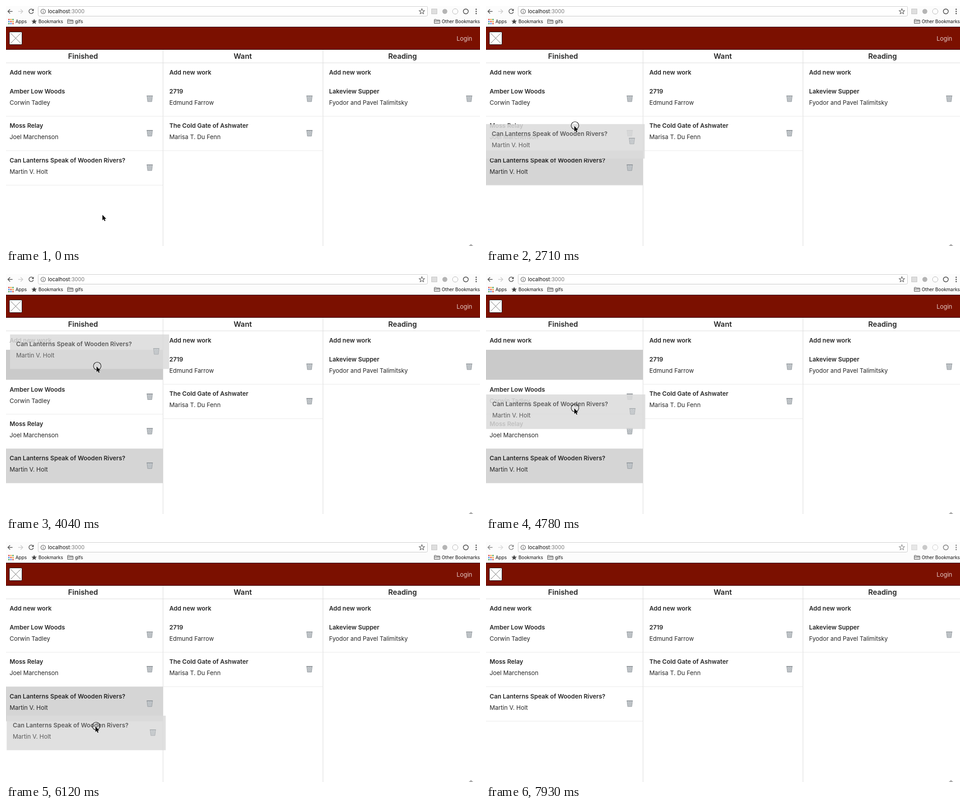
These frames come from a looping animation (1052 px wide and 532 px high, 8.03 s). An HTML page:

```html
<!DOCTYPE html>
<html lang="en">
<head>
<meta charset="utf-8">
<title>Reading list</title>
<style>
  html, body { margin: 0; width: 100%; height: 100%; overflow: hidden; background: #fff; }
  svg { display: block; width: 1052px; height: 532px; }
  text { font: 13.3px Inter, "Open Sans", sans-serif; fill: #262626; }
  .title { font-size: 13.5px; font-weight: 600; }
  .head { font-size: 16.2px; font-weight: 600; text-anchor: middle; }
  .bar { font-size: 10.3px; fill: #111; }
  .url { font-size: 11.5px; fill: #111; }
  .line { fill: none; stroke: #555; stroke-width: 1.5; }
  #ghost text { fill: #5c5c5c; }
  #ghost .bin { opacity: .7; }
</style>
</head>
<body>
<svg viewBox="0 0 1052 532">
  <defs>
    <g id="bin">
      <path d="M-6-6H6L4.6 6.5H-4.6Z" fill="#c6cbcf" stroke="#92989d"/>
      <path d="M-4.5-4 4 5.5M-1-4.5 4.5 1.5M-4.5 0 0 6M4.5-4-4 5.5M1-4.5-4.5 1.5M4.5 0 0 6" stroke="#a4a9ae" stroke-width=".6"/>
      <path d="M-6.8-6.2H6.8" stroke="#7f858a" stroke-width="1.3"/>
    </g>
    <path id="folder" d="M.5 9.5V1.5Q.5.5 1.5.5H4.5L6 2H12Q13 2 13 3V9.5ZM.5 4H13" fill="#ddd" stroke="#555"/>
    <path id="star" d="M0-6 1.7-2 6-1.8 2.7 1 3.8 5.3 0 2.9-3.8 5.3-2.7 1-6-1.8-1.7-2Z"/>
  </defs>

  <rect width="1052" height="46" fill="#fcfcfc"/>
  <rect x="71.5" y=".5" width="864" height="22" rx="3" fill="#fff" stroke="#c8c8c8"/>
  <g id="tools">
    <path class="line" d="M14.5 12H4.5M9 7.2 4.2 12 9 16.8"/>
    <path class="line" d="M27 12H37M32.5 7.2 37.3 12 32.5 16.8" style="stroke:#ccc"/>
    <path class="line" d="M60.2 9A5 5 0 1 0 60.8 13"/>
    <path d="M61.6 6V11H56.6Z" fill="#555"/>
    <use href="#star" x="923" y="12" fill="none" stroke="#555" stroke-width="1.1"/>
    <rect x="944.5" y="6.5" width="12" height="11" fill="#dedede" stroke="#c4c4c4"/>
    <circle cx="974" cy="12" r="5.5" fill="#b4b4b4"/>
    <circle cx="997" cy="12" r="6" fill="#fff" stroke="#b4b4b4"/>
    <circle cx="1020.5" cy="12" r="5.4" fill="#fff" stroke="#505050" stroke-width="1.6"/>
    <path d="M1043.5 7.3v.01m0 4.7v.01m0 4.7v.01" stroke="#555" stroke-width="3" stroke-linecap="round"/>
  </g>
  <circle cx="82.5" cy="12" r="5" fill="none" stroke="#555" stroke-width="1.1"/>
  <path d="M82.5 8.8V10M82.5 11.2V15" stroke="#555" stroke-width="1.2"/>
  <text class="url" x="93" y="16">localhost<tspan fill="#777">:3000</tspan></text>
  <g id="apps"></g>
  <use href="#star" x="62.5" y="34.5" fill="#444"/>
  <use href="#folder" x="136" y="29"/>
  <use href="#folder" x="950" y="29"/>
  <text class="bar" x="21" y="38">Apps</text>
  <text class="bar" x="72" y="38">Bookmarks</text>
  <text class="bar" x="153" y="38">gifs</text>
  <text class="bar" x="967" y="38">Other Bookmarks</text>

  <rect y="46" width="1052" height="51" fill="#7b1000"/>
  <path d="M0 46.5H1052M0 96.5H1052" stroke="#2a0500"/>
  <rect x="7.5" y="57.5" width="28" height="28" rx="2" fill="#fff" stroke="#111"/>
  <path d="M10 60 33 83M33 60 10 83" stroke="#444" stroke-width=".8"/>
  <text x="1000" y="76.5" style="fill:#e4cac6">Login</text>

  <path d="M0 126H1052M348.5 97V532M703.5 97V532" stroke="#dadada"/>
  <path d="M1027 532 1032 527.5 1037 532Z" fill="#aaa"/>
  <g id="board"></g>
  <rect id="gap" width="348" height="66.5" fill="#cacaca"/>
  <g id="ghost"></g>
  <g id="cursor">
    <circle id="ring" cx="1.5" cy="-1" r="8.5" fill="none" stroke="#111" stroke-width="1.1"/>
    <path d="M0 0V12L2.8 9.5 4.7 13.8 6.7 12.9 4.8 8.7H8.5Z" stroke="#fff" stroke-width=".9" paint-order="stroke"/>
  </g>
</svg>
<script>
const $ = id => document.getElementById(id);
const LOOP = 8030, START = 1364, TICK = 148, BLUR = 7930;
const TOP = 168, ROW = 76.4, GAP = 66.5, COLUMN = 354.5;

const columns = [
  ['Finished', [
    ['Amber Low Woods', 'Corwin Tadley'],
    ['Moss Relay', 'Joel Marchenson'],
    ['Can Lanterns Speak of Wooden Rivers?', 'Martin V. Holt']]],
  ['Want', [
    ['2719', 'Edmund Farrow'],
    ['The Cold Gate of Ashwater', 'Marisa T. Du Fenn']]],
  ['Reading', [
    ['Lakeview Supper', 'Fyodor and Pavel Talimitsky']]]
];
const books = columns[0][1];

const label = (x, y, s, cls = '') => `<text class="${cls}" x="${x}" y="${y}">${s}</text>`;
const content = ([title, author], x) =>
  label(x, 26, title, 'title') + label(x, 51, author) +
  `<use class="bin" href="#bin" x="${x + 311}" y="37.5"/>`;

$('board').innerHTML = columns.map(([name, list], c) => {
  const x = c * COLUMN;
  return label(x + 171, 117, name, 'head') + label(x + 8, 152, 'Add new work', 'title') +
    list.map((book, i) => `<g id="card${c}${i}" transform="translate(${x} ${TOP + i * ROW})">
      <rect width="348" height="76.5" fill="none"/>
      <path d="M${c ? -5 : 0} 76.3H348" stroke="#e8e8e8"/>${content(book, 8)}</g>`).join('');
}).join('');

$('ghost').innerHTML =
  '<rect width="353" height="76.5" fill="#dbdbdb" opacity=".85"/>' + content(books[2], 13.5);

const hues = ['#e0483e', '#f0a030', '#45a35a', '#4a86e8'];
$('apps').innerHTML = [...Array(9).keys()].map(i =>
  `<rect x="${5 + i % 3 * 4.5}" y="${28.5 + (i / 3 | 0) * 4.5}" width="3" height="3" rx=".8" fill="${hues[i % 4]}"/>`).join('');

// Pointer's turning points: tick, x, y
const drag = [[0, 214, 463], [4, 197, 345], [5, 197, 345], [9, 196, 266], [11, 198, 249],
  [17, 206, 158], [18, 201, 205], [22, 197.5, 291], [23, 196, 298], [25, 197, 320], [31, 198.5, 409]];

function pointer(n) {
  if (n >= 39) return [955 + (n - 39) * 32, 515 + (n - 39) * 4];
  const i = drag.findIndex(p => p[0] >= n);
  const b = drag[i < 0 ? drag.length - 1 : i], a = drag[i - 1] || b;
  const k = (n - a[0]) / (b[0] - a[0] || 1);
  return i > 0 ? [1, 2].map(j => a[j] + (b[j] - a[j]) * k) : b.slice(1);
}

const move = (el, [x, y]) => el.setAttribute('transform', `translate(${x} ${y})`);
const show = (el, on) => el.setAttribute('visibility', on ? 'inherit' : 'hidden');

function draw(t) {
  const n = Math.floor((t - START) / TICK);
  const during = (from, to) => n >= from && n < to;

  const slot = during(15, 24) ? 0 : during(11, 28) ? 1 : books.length;
  books.forEach((_, i) => move($('card0' + i), [0, TOP + i * ROW + (i >= slot ? GAP : 0)]));
  move($('gap'), [0, TOP + slot * ROW]);
  show($('gap'), slot < books.length);
  $('card02').firstElementChild.setAttribute('fill', during(4, 35) ? '#d5d5d5' : 'none');

  // The dragged copy trails the pointer by one tick
  const [x, y] = pointer(n - 1);
  move($('ghost'), [x - 197, y - 24]);
  show($('ghost'), during(6, 34));
  move($('cursor'), pointer(n));
  show($('cursor'), n < 37 || during(39, 42));
  $('ring').setAttribute('opacity', during(4, 34) ? 1 : 0);
  $('tools').setAttribute('opacity', t >= BLUR ? .7 : 1);
}

const begin = performance.now();
function frame() {
  draw((performance.now() - begin) % LOOP);
  requestAnimationFrame(frame);
}
frame();
</script>
</body>
</html>
```
